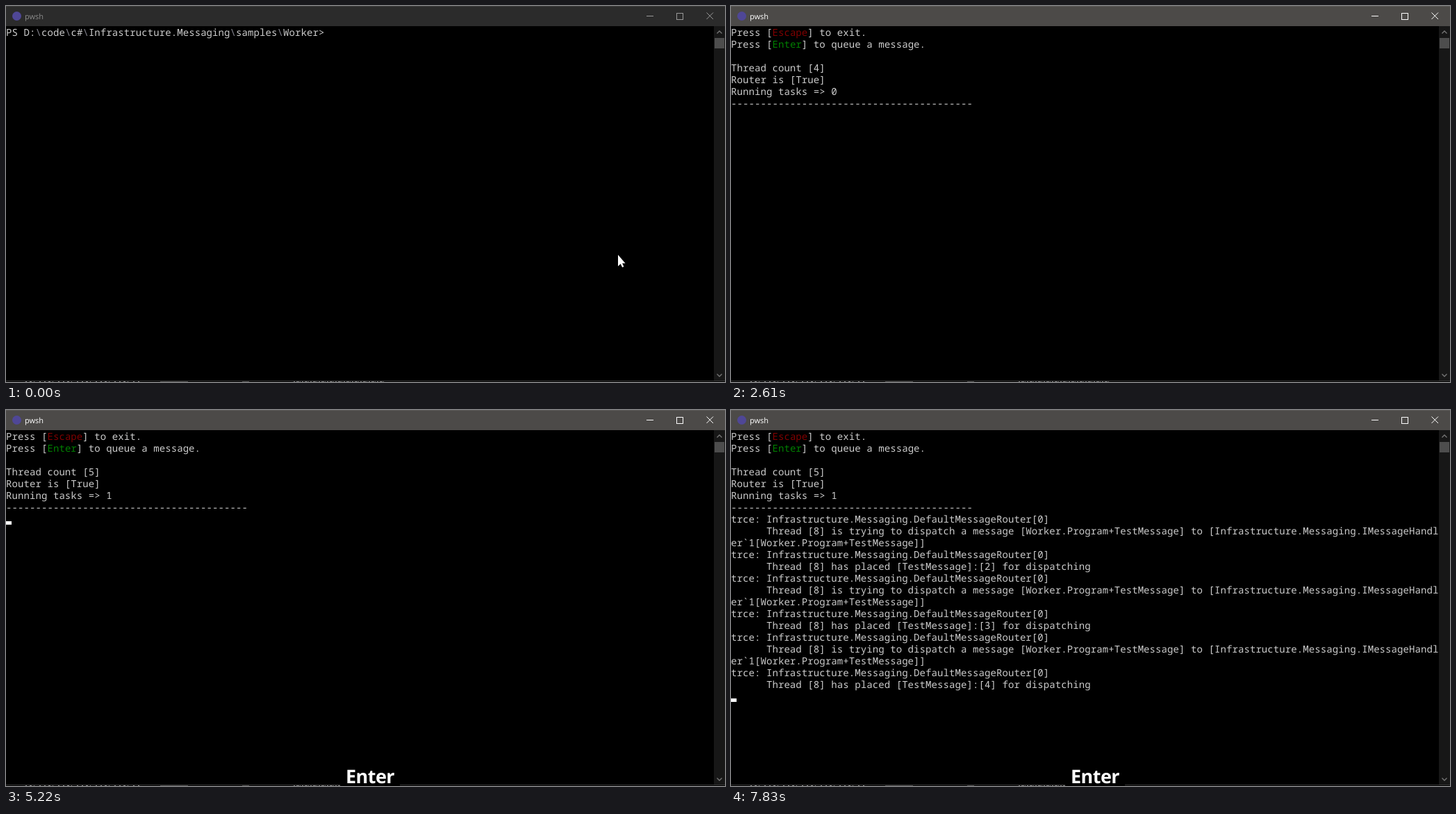
Recreate the animation shown at these times as an HTML page. Size 1035 px wide and 541 px high, loop 8000 ms.

```html
<!DOCTYPE html>
<html lang="en">
<head>
<meta charset="utf-8">
<title>Worker sample</title>
<style>
  html, body { margin: 0; width: 100%; height: 100%; overflow: hidden; background: #000; }
  svg { display: block; width: 1035px; height: 541px; }
  text { white-space: pre; text-rendering: geometricPrecision; }
  #term { font: 14px "Noto Sans Mono", "DejaVu Sans Mono", monospace; letter-spacing: .0875px; fill: #ccc; }
  #caption { font: 700 27px "Open Sans", "Noto Sans", sans-serif; letter-spacing: -.6px; fill: #fff; text-anchor: middle; }
  #title { font: 11px "Open Sans", "Noto Sans", sans-serif; }
  #bar { fill: #2b2b2b; }
  #title { fill: #8c8c8c; }
  #buttons { stroke: #999; fill: none; }
  #edge { fill: #3c3c3c; }
  .active #bar { fill: #4c4a48; }
  .active #title { fill: #fff; }
  .active #buttons { stroke: #fff; }
  .active #edge { fill: #5c5a58; }
  .path { fill: #85858f; }
  .cmd { fill: #ff0; }
  .opt { fill: #666; }
  .red { fill: #800000; }
  .green { fill: #008000; }
</style>
</head>
<body>
<svg id="stage" viewBox="0 0 1035 541">
  <rect width="1035" height="541"/>
  <rect id="bar" width="1035" height="29"/>
  <rect id="edge" width="1035" height="1"/>
  <circle cx="15.5" cy="14.5" r="6.5" fill="#4f4796"/>
  <text id="title" x="27" y="19">pwsh</text>
  <g id="buttons">
    <path d="M922 14.5h10M965.5 10.5h9v9h-9z" shape-rendering="crispEdges"/>
    <path d="M1008.5 9.5l9.5 9.5M1018 9.5l-9.5 9.5"/>
  </g>

  <rect x="1019" y="29" width="16" height="510" fill="#171717"/>
  <rect x="1020" y="46" width="14" height="15" fill="#4d4d4d"/>
  <path d="M1023.5 39.5l3.5-3.5 3.5 3.5M1023.5 529.5l3.5 3.5 3.5-3.5" fill="none" stroke="#777" stroke-width="1.3"/>

  <!-- sliver of the window behind -->
  <rect y="539" width="1035" height="1" fill="#383838"/>
  <g fill="none" stroke-width="1">
    <path d="M28 540.5H196" stroke="#8a8a8a" stroke-dasharray="2 4 3 3 1 7 2 5"/>
    <path d="M222 540.5h40M340 540.5h10" stroke="#444"/>
    <path id="behind" d="M414 540.5H545" stroke="#777" stroke-dasharray="2 2 4 1 1 2"/>
  </g>

  <g id="term"></g>
  <rect id="cursor" width="8" height="5" fill="#fff"/>
  <rect id="plate" y="514" height="27" fill="#000"/>
  <text id="caption" x="524" y="537"></text>
  <path id="mouse" d="M881 358v16.5l3.7-3.5 2.4 5 2.3-1.1-2.3-4.7h4.4z" fill="#fff"/>
</svg>
<script>
  const STEP = 870, LOOP = 8000, ROW = 17, TOP = 29;
  const $ = id => document.getElementById(id);
  const span = (cls, s) => `<tspan class="${cls}">${s}</tspan>`;

  const prompt = "PS D:\\code\\c#\\Infrastructure.Messaging\\samples\\Worker&gt; "
    .replace(/\\/g, span("path", "\\"));
  const command = span("cmd", "dotnet") + " run " + span("opt", "-c") + " Release";
  const keys = ["dotnet", "run", "-c", "Release"]
    .map(word => [...word].join("  ")).join("  Space  ");

  const header = (threads, tasks) => [
    `Press [${span("red", "Escape")}] to exit.`,
    `Press [${span("green", "Enter")}] to queue a message.`,
    "",
    `Thread count [${threads}]`,
    "Router is [True]",
    `Running tasks =&gt; ${tasks}`,
    "-".repeat(41)
  ];

  const source = "trce: Infrastructure.Messaging.DefaultMessageRouter[0]";
  const log = n => [
    source,
    "      Thread [8] is trying to dispatch a message [Worker.Program+TestMessage] to [Infrastructure.Messaging.IMessageHandl",
    "er`1[Worker.Program+TestMessage]]",
    source,
    `      Thread [8] has placed [TestMessage]:[${n}] for dispatching`
  ];

  function linesAt(step) {
    if (step === 0) return [prompt];
    if (step < 3) return [prompt + command];
    if (step < 5) return header(4, 0);
    if (step === 5) return [...header(4, 0), ...log(1)];
    const lines = header(5, 1);
    for (let n = 2; n <= step - 5; n++) lines.push(...log(n));
    return lines;
  }

  const captionAt = step => step === 1 ? keys : step === 0 || step === 3 ? "" : "Enter";
  const show = (el, on) => el.setAttribute("visibility", on ? "visible" : "hidden");

  function draw(step) {
    // the header replaces the prompt one step after Enter
    const lines = linesAt(step);
    $("term").innerHTML = lines
      .map((s, i) => `<text x="0" y="${TOP + 14 + i * ROW}">${s}</text>`).join("");

    $("stage").classList.toggle("active", step > 0);
    show($("mouse"), step === 0);
    show($("cursor"), step >= 6);
    $("cursor").setAttribute("y", TOP + lines.length * ROW + 12);

    const caption = captionAt(step), width = caption === keys ? 790 : 86;
    $("caption").textContent = caption;
    show($("plate"), caption);
    $("plate").setAttribute("x", 524 - width / 2);
    $("plate").setAttribute("width", width);
  }

  let shown = -1;
  const start = performance.now();
  function tick() {
    const step = Math.floor((performance.now() - start) % LOOP / STEP);
    if (step !== shown) draw(shown = step);
    requestAnimationFrame(tick);
  }
  tick();
</script>
</body>
</html>
```
